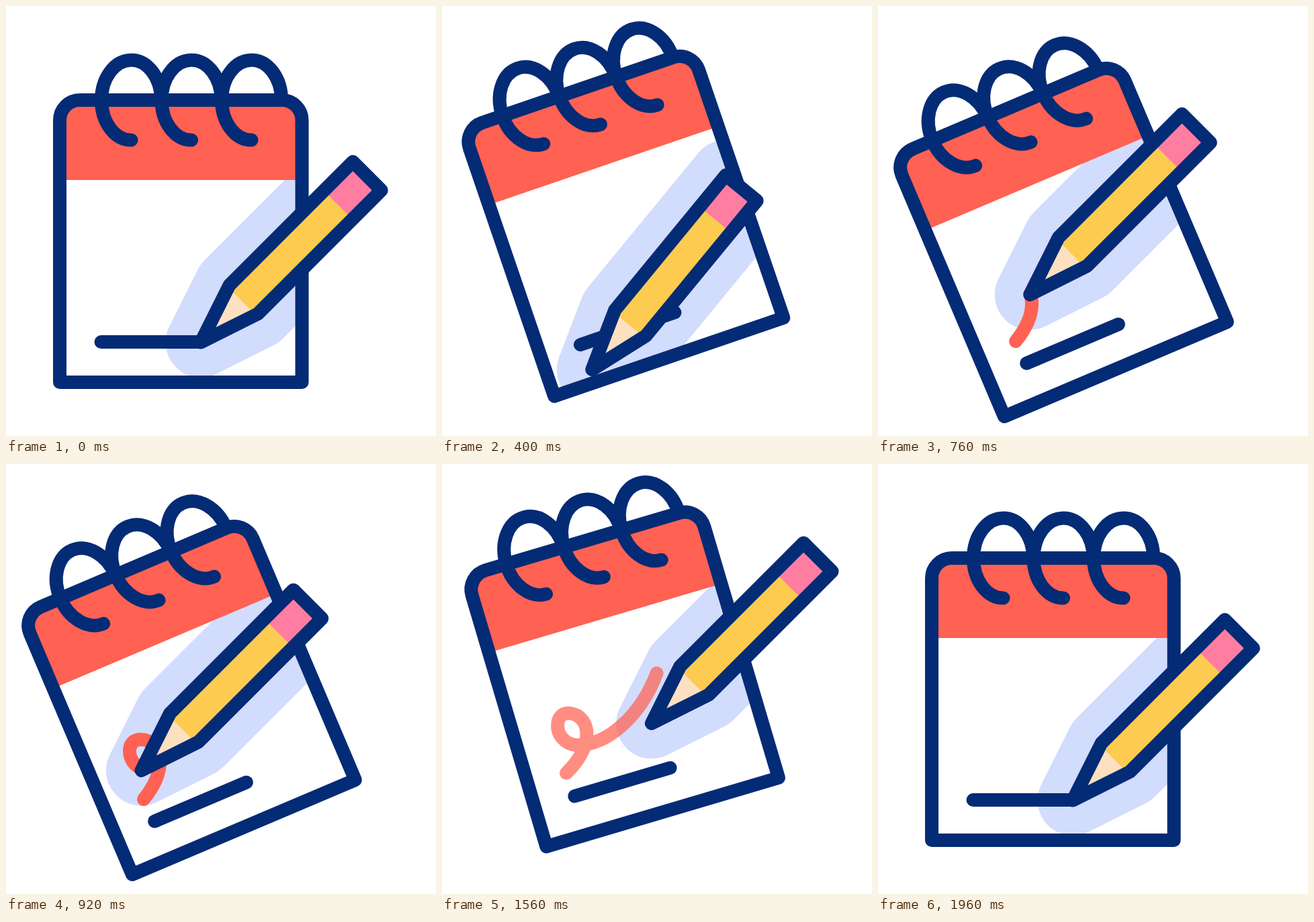
Write an HTML page with a canvas that moves like this. It is 640 by 640 pixels and loops after 2000 ms.

```html
<!DOCTYPE html>
<html lang="en">
<head>
<meta charset="utf-8">
<title>Notepad and pencil</title>
<style>
  html, body { margin: 0; width: 100%; height: 100%; overflow: hidden; background: #fff; }
  canvas { display: block; }
</style>
</head>
<body>
<canvas id="stage" width="640" height="640"></canvas>
<script>
const ctx = document.getElementById('stage').getContext('2d');
const LOOP = 2000;
const NAVY = '#042b75', RED = '#ff6152', SHADE = '#d2dcfd';
const YELLOW = '#fccb50', PINK = '#ff7da0', PEACH = '#fde0bf';

const page = new Path2D('M80 560V170A30 30 0 0 1 110 140H410.5A30 30 0 0 1 440.5 170V560Z');
const rings = new Path2D([186.5, 276, 365.5].map(x =>
  `M${x} 199.5A44.5 59.5 0 1 1 ${x + 44.5} 139.5`).join(''));
const line = new Path2D('M141.5 500H290');

// Pencil along the x axis with its tip at the origin
const pencil = new Path2D('M0 0L90 -30H350V30H90Z');

// Signature, in stage coordinates of the tilted pad
const inkData = 'M205 499C222 478 229 459 229 443C229 423 217 410 200 410' +
  'C189 410 184 418 184 427C184 444 198 456 214 456C262 452 306 400 322 336';
const ink = new Path2D(inkData);
const inkCurve = document.createElementNS('http://www.w3.org/2000/svg', 'path');
inkCurve.setAttribute('d', inkData);
const inkLength = inkCurve.getTotalLength();

const HOME = { x: 290, y: 500.5 };
const TILT = 23;
const rad = deg => deg * Math.PI / 180;
const mix = (a, b, k) => a + (b - a) * k;
const span = (t, from, to) => Math.min(1, Math.max(0, (t - from) / (to - from)));
const smooth = s => s * s * (3 - 2 * s);
const hop = (s, peak) => smooth(s < peak ? s / peak : (1 - s) / (1 - peak));

// Parameter of the timing curve (1/3, 0, pull, 1) at time u
function curveParam(u, pull) {
  let lo = 0, hi = 1;
  for (let i = 0; i < 24; i++) {
    const s = (lo + hi) / 2, r = 1 - s;
    if (r * r * s + 3 * r * s * s * pull + s ** 3 < u) lo = s; else hi = s;
  }
  return u >= 1 ? 1 : u <= 0 ? 0 : hi;
}

function pose(t) {
  const out = span(t, 133, 500);
  const back = curveParam(span(t, 1440, 1960), 0.174);
  const write = span(t, 500, 1233);
  const drawn = 2.1 * write ** 2 - 1.1 * write ** 3;
  const lift = hop(out, 0.5);
  const returned = smooth(back);
  const shift = smooth(out) - returned;

  const nib = inkCurve.getPointAtLength(inkLength * drawn);
  nib.x -= 1.5 * drawn;
  nib.y += 5 * drawn;
  const goal = returned > 0 ? returned : 1 - smooth(out);
  return {
    pad: {
      x: 260 + 11.6 * shift,
      y: 350 - 2.6 * shift - 43 * lift - 42.5 * hop(back, 0.53),
      angle: -TILT * shift
    },
    tip: {
      x: mix(nib.x, HOME.x, goal) + 5.5 * lift,
      y: mix(nib.y, HOME.y, goal) + 75 * lift,
      angle: -45 - 10 * lift
    },
    drawn,
    inkAlpha: 1 - returned
  };
}

function place({ x, y, angle }) {
  ctx.translate(x, y);
  ctx.rotate(rad(angle));
}

function scoped(draw) {
  ctx.save();
  draw();
  ctx.restore();
}

function stroke(path, color, width = 20) {
  ctx.strokeStyle = color;
  ctx.lineWidth = width;
  ctx.stroke(path);
}

function onPad(pad, draw) {
  scoped(() => {
    place(pad);
    ctx.translate(-260, -350);
    draw();
  });
}

function drawPencil() {
  ctx.fillStyle = PEACH;
  ctx.fill(pencil);
  ctx.fillStyle = YELLOW;
  ctx.fillRect(86.5, -30, 203, 60);
  ctx.fillStyle = PINK;
  ctx.fillRect(289, -30, 61, 60);
  stroke(pencil, NAVY);
}

function render(t) {
  const { pad, tip, drawn, inkAlpha } = pose(t);
  ctx.fillStyle = '#fff';
  ctx.fillRect(0, 0, 640, 640);
  ctx.lineCap = ctx.lineJoin = 'round';

  // Pencil shadow, only on the white paper
  scoped(() => {
    place(pad);
    ctx.beginPath();
    ctx.rect(-180, -92, 360.5, 302);
    ctx.clip();
    ctx.setTransform(1, 0, 0, 1, 0, 0);
    place(tip);
    ctx.fillStyle = SHADE;
    ctx.fill(pencil);
    stroke(pencil, SHADE, 105);
  });

  onPad(pad, () => {
    scoped(() => {
      ctx.clip(page);
      ctx.fillStyle = RED;
      ctx.fillRect(80, 140, 361, 119);
    });
    stroke(page, NAVY);
    stroke(rings, NAVY);
    stroke(line, NAVY);
    if (drawn > 0 && inkAlpha > 0) {
      ctx.translate(260, 350);
      ctx.rotate(rad(TILT));
      ctx.translate(-271.6, -347.4);
      ctx.globalAlpha = inkAlpha;
      if (drawn < 1) ctx.setLineDash([inkLength * drawn, inkLength * 2]);
      stroke(ink, RED);
    }
  });

  scoped(() => {
    place(tip);
    drawPencil();
  });
}

function tick(now) {
  render(now % LOOP);
  requestAnimationFrame(tick);
}
render(0);
requestAnimationFrame(tick);
</script>
</body>
</html>
```
